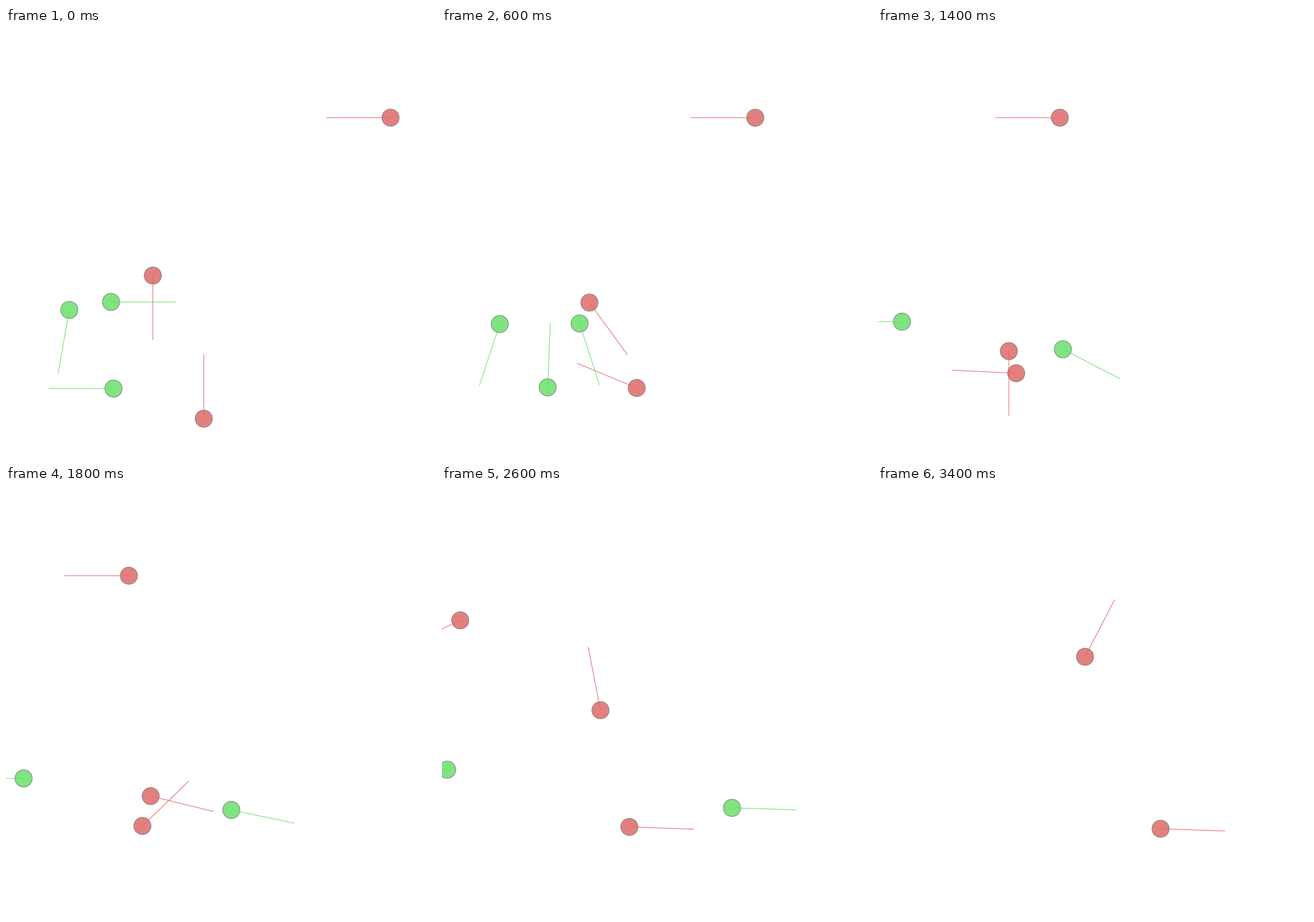
A matplotlib script for the animation above (3500 ms loop, 700 px wide and 700 px high).

```python
import matplotlib.pyplot as plt
import numpy as np
from matplotlib.animation import FuncAnimation
from matplotlib.patches import Circle

SIZE, DPI = 700, 100
FRAMES, INTERVAL = 35, 100
RADIUS, REACH = 14, 105
PX = 72 / DPI

RED = ("#e28080", "#e86464")
GREEN = ("#80e480", "#64e064")
RIM = "#808080"

fig = plt.figure(figsize=(SIZE / DPI, SIZE / DPI), dpi=DPI, facecolor="white")
ax = fig.add_axes([0, 0, 1, 1])
ax.set(xlim=(0, SIZE), ylim=(SIZE, 0))
ax.axis("off")


def ease(t, start, end):
    u = np.clip((t - start) / (end - start), 0, 1)
    return u * u * (3 - 2 * u)


def mix(a, b, u):
    return a + (b - a) * u


def slopes(keys, vals):
    """Monotone tangents: harmonic mean of both sides, flat at a turn."""
    d = np.diff(vals) / np.diff(keys)
    a, b = d[:-1], d[1:]
    same = a * b > 0
    inner = np.where(same, 2 * a * b / np.where(same, a + b, 1), 0)
    return np.concatenate([d[:1], inner, d[-1:]])


def glide(t, keys, vals):
    m = slopes(keys, vals)
    i = int(np.clip(np.searchsorted(keys, t, "right") - 1, 0, len(keys) - 2))
    h = keys[i + 1] - keys[i]
    u = (t - keys[i]) / h
    return (mix(vals[i], vals[i + 1], u * u * (3 - 2 * u))
            + h * u * (1 - u) * (m[i] * (1 - u) - m[i + 1] * u))


class Agent:
    """Disc with a heading line; lives until its last (step, x, y) waypoint."""

    def __init__(self, colors, heading, *path):
        self.heading = heading
        self.t, self.x, self.y = np.array(path, float).T
        fill, stroke = colors
        self.disc = Circle((0, 0), RADIUS, fc=fill, ec=RIM, lw=PX, zorder=1)
        ax.add_patch(self.disc)
        self.line, = ax.plot([], [], color=stroke, lw=PX, zorder=2,
                             solid_capstyle="butt", snap=False)

    def draw(self, step):
        alive = step <= self.t[-1]
        self.disc.set_visible(alive)
        self.line.set_visible(alive)
        if alive:
            x, y = glide(step, self.t, self.x), glide(step, self.t, self.y)
            a = np.radians(self.heading(step))
            self.disc.center = x, y
            self.line.set_data([x, x + REACH * np.cos(a)],
                               [y, y + REACH * np.sin(a)])
        return self.disc, self.line


# Headings in degrees, clockwise from the right.
def sway(t):
    return 100 + ease(t, 5, 10) * (105 + 50 * np.cos(np.pi * (t - 10) / 6))


def dip(t):
    return 14.8 * t * t * np.exp(-t / 3)


def spin(t):
    return 180 + 2.2 * t * (t + 1)


def veer(t):
    return 180 - 25 * ease(t, 18, 23)


def climb(t):
    search = 90 + 36 * np.sin(np.pi * t / 4) * (1 - ease(t, 10, 14))
    return mix(search, 0.6 * (t - 26) ** 2 - 101, ease(t, 14, 22))


def pursue(t):
    search = 225 + 45 * np.cos(2 * np.pi * t / 9)
    return mix(search, 362, ease(t, 14, 22))


agents = [
    Agent(GREEN, sway, (0, 103, 459), (6, 94, 482), (14, 39, 478),
          (22, 20, 473), (30, -4, 446)),
    Agent(GREEN, dip, (0, 171, 446), (6, 224, 481), (10, 247, 499),
          (14, 301, 523), (22, 429, 529), (26, 472, 524), (32, 497, 534)),
    Agent(GREEN, spin, (0, 175, 587), (6, 172, 585), (12, 198, 577)),
    Agent(RED, veer, (0, 626, 146), (6, 510, 146), (14, 296, 146),
          (18, 200, 146), (22, 110, 183), (30, -48, 254)),
    Agent(RED, climb, (0, 239, 403), (6, 240, 447), (10, 226, 472),
          (14, 213, 526), (22, 258, 459), (26, 258, 365), (34, 337, 278)),
    Agent(RED, pursue, (0, 322, 636), (6, 317, 586), (14, 225, 562),
          (22, 221, 549), (26, 305, 555), (34, 460, 558)),
]


def update(step):
    return [part for agent in agents for part in agent.draw(step)]


anim = FuncAnimation(fig, update, frames=FRAMES, interval=INTERVAL,
                     repeat=True, repeat_delay=0, blit=False)
plt.show()
```
